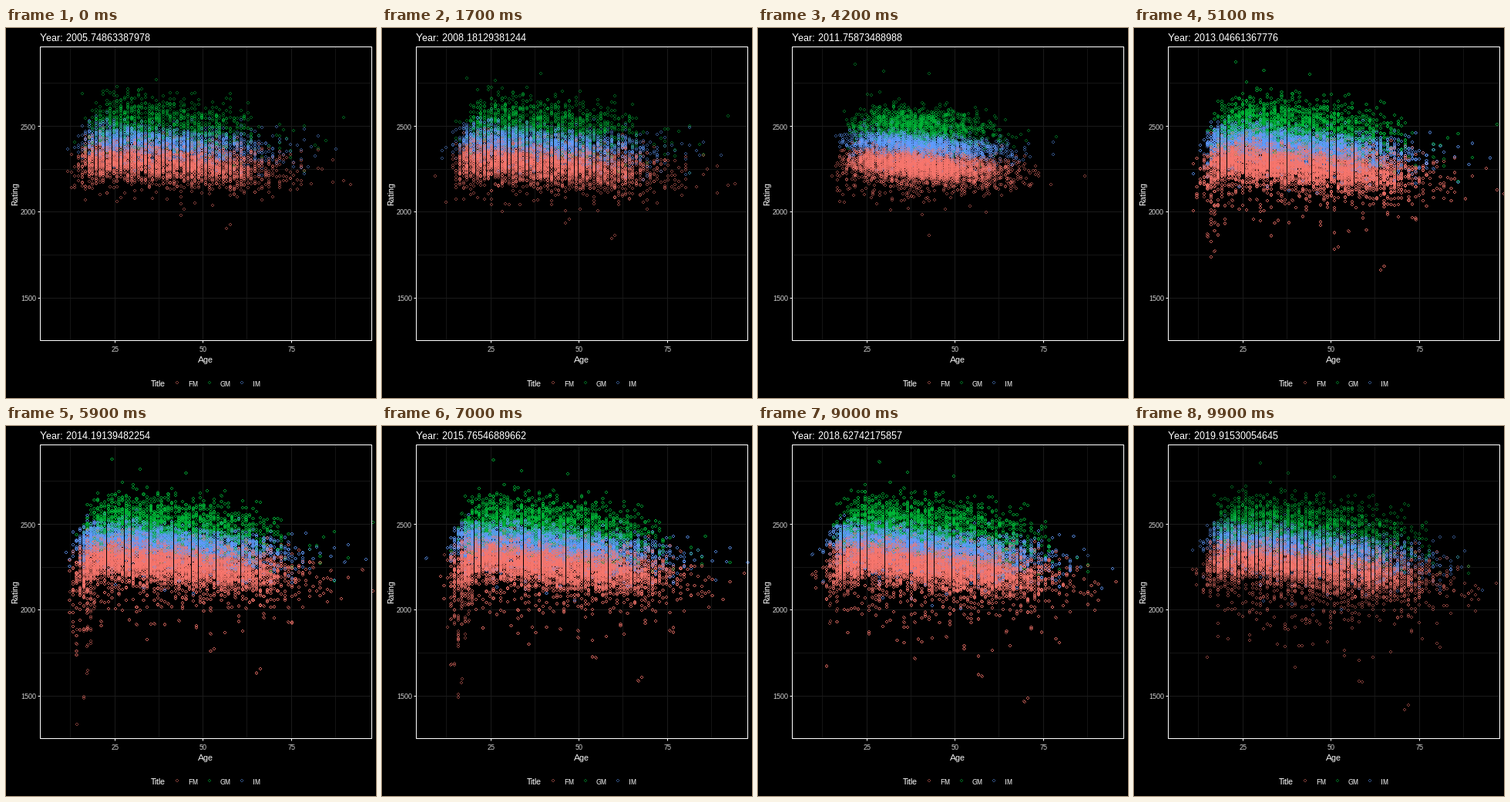
A matplotlib script for the animation above (10000 ms loop, 480 px wide and 480 px high).

```python
import numpy as np
import matplotlib.pyplot as plt
from matplotlib.animation import FuncAnimation
from matplotlib.patches import Rectangle
from matplotlib.path import Path

plt.rcParams.update({
    "font.family": "Liberation Sans",
    "text.hinting": "default",
    "text.hinting_factor": 1,
})

SIZE, FRAMES, INTERVAL = 480, 100, 100
START, END = 2005 + 274 / 366, 2019 + 335 / 366
STEP = (END - START) / (FRAMES - 1)
LEFT, TOP, RIGHT, BOTTOM = 44.5, 24.5, 474.5, 405.5
COLORS = {"GM": "#00BA38", "IM": "#619CFF", "FM": "#F8766D"}
ALPHA = 0.5
LAYERS = 6

# players per birth year, youngest and oldest typical age, mean rating, spread
MODEL = {
    "GM": (30, 19.5, 55, 2535, 70),
    "IM": (46, 17.5, 58, 2425, 44),
    "FM": (70, 16.5, 60, 2315, 54),
}
# birth year, peak rating and peak year of the top players
LEADERS = [(1969, 2815, 2010), (1982, 2825, 2013), (1990, 2880, 2014.5)]


def px(age):
    return 141 + (age - 25) * 4.58


def py(rating):
    return 127.5 - (rating - 2500) * 0.2229


def sigmoid(v):
    return 1 / (1 + np.exp(-v))


def make_pool(title, rng):
    n = int(MODEL[title][0] * 1.3 * 104)
    return dict(
        birth=rng.integers(1909, 2013, n),
        rank=rng.random(n) * 1.3,
        skill=rng.normal(size=n),
        phase=rng.random(n),
        weak=np.where(rng.random(n) < 0.22, rng.exponential(size=n), 0),
        junior=np.where(rng.random(n) < 0.6, rng.exponential(size=n), 0),
    )


rng = np.random.default_rng(64)
POOLS = {title: make_pool(title, rng) for title in MODEL}


def leaders(date):
    return np.array([
        (date - birth, peak - 2.5 * max(year - date, 0) ** 2 - 4 * max(date - year, 0))
        for birth, peak, year in LEADERS]).T


def snapshot(title, date):
    """Pixel positions of all players on one rating list."""
    _, young, old, mean, spread = MODEL[title]
    pool = POOLS[title]
    g = (date - START) / (END - START)
    boom = np.exp(-((date - 2015) / 3.5) ** 2)
    age = date - pool["birth"]

    share = sigmoid((age - young + 1.2 * boom) / 1.1) * sigmoid((old + 8 * g - age) / 5.3)
    active = pool["rank"] < share * (1 + 0.25 * min(1, 1.6 * g))

    wide = spread * (1 + 0.012 * np.maximum(age - 45, 0))
    rating = mean + pool["skill"] * wide
    rating += 12 * np.sin(2 * np.pi * (date / 7 + pool["phase"]))
    rating -= (1.4 + 1.1 * g) * np.maximum(age - 25, 0)
    if title == "GM":
        rating -= 8 * np.maximum(25 - age, 0)
    else:
        rating -= 16 * np.maximum(17 - age, 0)
        rating -= pool["weak"] * (40 + 60 * g) * (1 if title == "FM" else 0.5)
    if title == "FM":
        rating -= pool["junior"] * (60 + 140 * boom) * sigmoid((17.5 - age) / 1.3)

    pts = np.array([age[active], np.maximum(rating[active], 1330)])
    if title == "GM":
        pts = np.hstack([leaders(date), pts])
    return np.array([px(pts[0]), py(pts[1])])


# lists came out quarterly, then every two months, then monthly
months = [*range(2005 * 12 + 9, 2009 * 12 + 7, 3),
          *range(2009 * 12 + 8, 2012 * 12 + 7, 2),
          *range(2012 * 12 + 7, 2020 * 12)]
LISTS = {}
for m in months:
    LISTS.setdefault(round((m / 12 - START) / STEP), []).append(m / 12)
KEYS = sorted(LISTS)


def points(title, i):
    """All lists of a frame, or a row by row blend of its neighbours."""
    if i in LISTS:
        return np.hstack([snapshot(title, d) for d in LISTS[i]])
    before = max(k for k in KEYS if k < i)
    after = min(k for k in KEYS if k > i)
    a = snapshot(title, LISTS[before][-1])
    b = snapshot(title, LISTS[after][0])
    # new entries push the rows after the leaders out of step
    top = len(LEADERS)
    b = np.hstack([b[:, :top], np.roll(b[:, top:], 5, axis=1)])
    n = min(a.shape[1], b.shape[1])
    f = (i - before) / (after - before)
    return a[:, :n] * (1 - f) + b[:, :n] * f


def ring():
    """Hollow dot four pixels wide, built from unit squares."""
    edge = (-2, 1)
    cells = [(x, y) for x in range(-2, 2) for y in range(-2, 2)
             if (x in edge) != (y in edge)]
    square = Path.unit_rectangle()
    return Path.make_compound_path(
        *[Path(square.vertices + c, square.codes) for c in cells])


DOT = ring()

fig = plt.figure(figsize=(SIZE / 72, SIZE / 72), dpi=72, facecolor="black")
ax = fig.add_axes([0, 0, 1, 1])
ax.set(xlim=(0, SIZE), ylim=(SIZE, 0))
ax.axis("off")


def rule(xs, ys, color):
    ax.plot(xs, ys, color=color, lw=1, zorder=1, snap=False,
            solid_capstyle="butt")


def label(x, y, s, size, color="white", **kw):
    return ax.text(x, y, s, fontsize=size, color=color, **kw)


def dots(title, x=(), y=(), zorder=2):
    return ax.plot(x, y, ls="none", marker=DOT, ms=4, mew=0, mec="none",
                   mfc=COLORS[title], alpha=ALPHA, zorder=zorder)[0]


def center(v):
    return np.floor(v) + 0.5


for age in np.arange(12.5, 90, 25):
    rule([center(px(age))] * 2, [TOP, BOTTOM], "#141414")
for rating in (1750, 2250, 2750):
    rule([LEFT, RIGHT], [center(py(rating))] * 2, "#141414")
for age in (25, 50, 75):
    x = center(px(age))
    rule([x, x], [TOP, BOTTOM], "#1a1a1a")
    rule([x, x], [BOTTOM, BOTTOM + 3], "white")
    label(x, 420, str(age), 9, "#d9d9d9", ha="center")
for rating in (1500, 2000, 2500):
    y = center(py(rating))
    rule([LEFT, RIGHT], [y, y], "#1a1a1a")
    rule([LEFT - 3, LEFT], [y, y], "white")
    label(39, y + 4, str(rating), 9, "#d9d9d9", ha="right")

ax.add_patch(Rectangle((LEFT, TOP), RIGHT - LEFT, BOTTOM - TOP, fill=False,
                       ec="white", lw=1, zorder=5, snap=False))
label(259, 434, "Age", 11, ha="center")
label(17, 215, "Rating", 11, rotation=90, ha="right", va="center")
label(188, 465, "Title", 11)
for x, title in ((222, "FM"), (264, "GM"), (306, "IM")):
    dots(title, [x], [460])
    label(x + 14, 465, title, 9)
heading = label(44, 17, "", 13)

layers = [{t: dots(t, zorder=3) for t in COLORS} for _ in range(LAYERS)]
CLOUDS = [{t: points(t, i) for t in COLORS} for i in range(FRAMES)]


def update(i):
    heading.set_text(f"Year: {START + i * STEP:.15g}")
    for title, cloud in CLOUDS[i].items():
        for layer, part in zip(layers, np.array_split(cloud, LAYERS, axis=1)):
            layer[title].set_data(part[0], part[1])
    return [heading]


anim = FuncAnimation(fig, update, frames=FRAMES, interval=INTERVAL,
                     repeat=True, repeat_delay=0)
plt.show()
```
